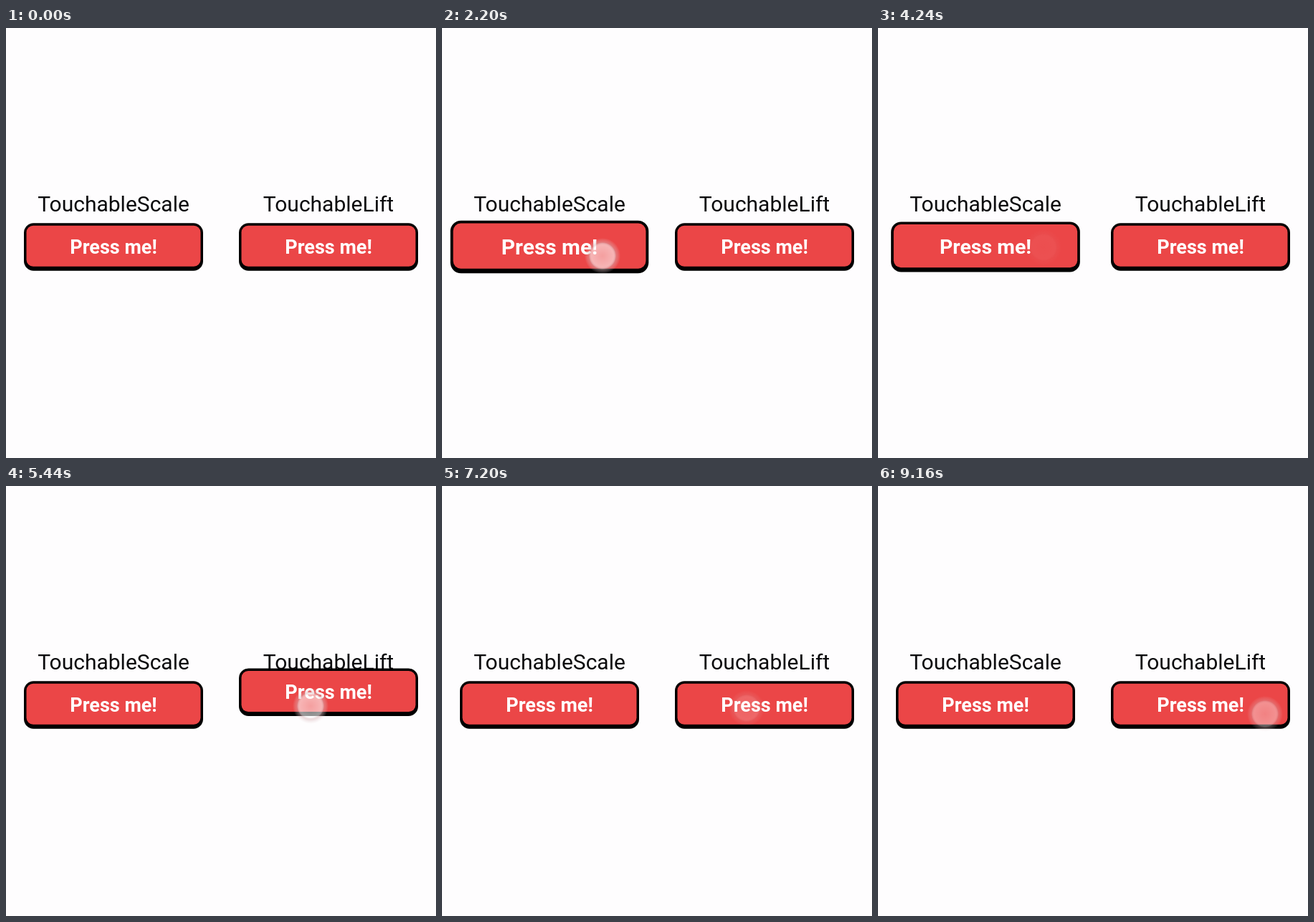
Animation, 600 px wide and 600 px high, one loop 9.2 s. Source, as an HTML page:

```html
<!DOCTYPE html>
<html lang="en">
<head>
<meta charset="utf-8">
<title>Touchable buttons</title>
<style>
  html, body { margin: 0; width: 100%; height: 100%; overflow: hidden; background: #fefdfe; }
  svg { display: block; width: 100%; height: 100%; }
  text { font-family: Roboto, sans-serif; text-anchor: middle; }
  .title { font-size: 30px; fill: #0a0a0c; }
  .label { font-size: 27px; font-weight: 700; fill: #fff; }
</style>
</head>
<body>
<svg viewBox="0 0 600 600">
  <defs>
    <radialGradient id="glow">
      <stop offset="0" stop-color="#fff" stop-opacity=".48"/>
      <stop offset=".62" stop-color="#fff" stop-opacity=".6"/>
      <stop offset=".7" stop-color="#e8d4d6" stop-opacity=".66"/>
      <stop offset=".76" stop-color="#d8b4b6" stop-opacity=".45"/>
      <stop offset="1" stop-color="#e8d4d6" stop-opacity="0"/>
    </radialGradient>
    <g id="button">
      <rect x="-125" y="-33" width="250" height="66.5" rx="13.5" fill="#000"/>
      <rect x="-121.5" y="-29.5" width="243" height="57" rx="9.5" fill="#eb4647"/>
      <text class="label" y="9.5">Press me!</text>
    </g>
  </defs>
  <text class="title" x="150" y="256">TouchableScale</text>
  <text class="title" x="450" y="256">TouchableLift</text>
  <use id="scale" href="#button"/>
  <use id="lift" href="#button"/>
  <circle id="touch" r="25" fill="url(#glow)"/>
</svg>
<script>
  const LOOP = 9200, FADE_IN = 300, FADE_OUT = 150;
  const STIFFNESS = 100, DAMPING = 10;
  const byId = id => document.getElementById(id);
  const scale = byId('scale'), lift = byId('lift'), touch = byId('touch');

  // Press and release times of each button
  const scalePresses = [[1690, 2640], [3965, 4105]];
  const liftPresses = [[5232, 5680], [5990, 6215], [7310, 7590]];

  const touches = [
    { start: 1600, end: 2640, x: 224, y: 318 },
    { start: 3640, end: 4105, x: 231, y: 306 },
    { start: 5040, end: 5680, x: 425, y: 307 },
    { start: 5790, end: 6215, x: 425, y: 308 },
    { start: 7110, end: 7590, x: 425, y: 310 },
    { start: 8960, end: LOOP, x: 540, y: 318 }
  ];

  // Underdamped spring, solved exactly after dt ms
  function spring({ pos, vel }, target, dt) {
    const s = dt / 1000, k = DAMPING / 2;
    const w = Math.sqrt(STIFFNESS - k * k);
    const a = pos - target, b = (vel + k * a) / w;
    const decay = Math.exp(-k * s), c = Math.cos(w * s), n = Math.sin(w * s);
    return {
      pos: target + decay * (a * c + b * n),
      vel: decay * ((b * w - k * a) * c - (a * w + k * b) * n)
    };
  }

  function pressAmount(presses, t) {
    let state = { pos: 0, vel: 0 }, target = 0, last = 0;
    presses.flat().forEach((time, i) => {
      if (time > t) return;
      state = spring(state, target, time - last);
      target = i % 2 ? 0 : 1;
      last = time;
    });
    return spring(state, target, t - last).pos;
  }

  const clamp = v => Math.max(0, Math.min(1, v));

  function drawTouch(t) {
    const now = touches.find(p => t >= p.start && t < p.end + FADE_OUT);
    let alpha = 0;
    if (now) {
      alpha = clamp((t - now.start) / FADE_IN) * clamp(1 - (t - now.end) / FADE_OUT);
      touch.setAttribute('cx', now.x);
      touch.setAttribute('cy', now.y);
    }
    touch.setAttribute('opacity', alpha);
  }

  function draw(t) {
    const size = 1 + 0.1 * pressAmount(scalePresses, t);
    const rise = 20 * pressAmount(liftPresses, t);
    scale.setAttribute('transform', `translate(150 305.2) scale(${size})`);
    lift.setAttribute('transform', `translate(450 ${305.2 - rise})`);
    drawTouch(t);
  }

  const begin = performance.now();
  function tick() {
    draw((performance.now() - begin) % LOOP);
    requestAnimationFrame(tick);
  }
  draw(0);
  requestAnimationFrame(tick);
</script>
</body>
</html>
```
